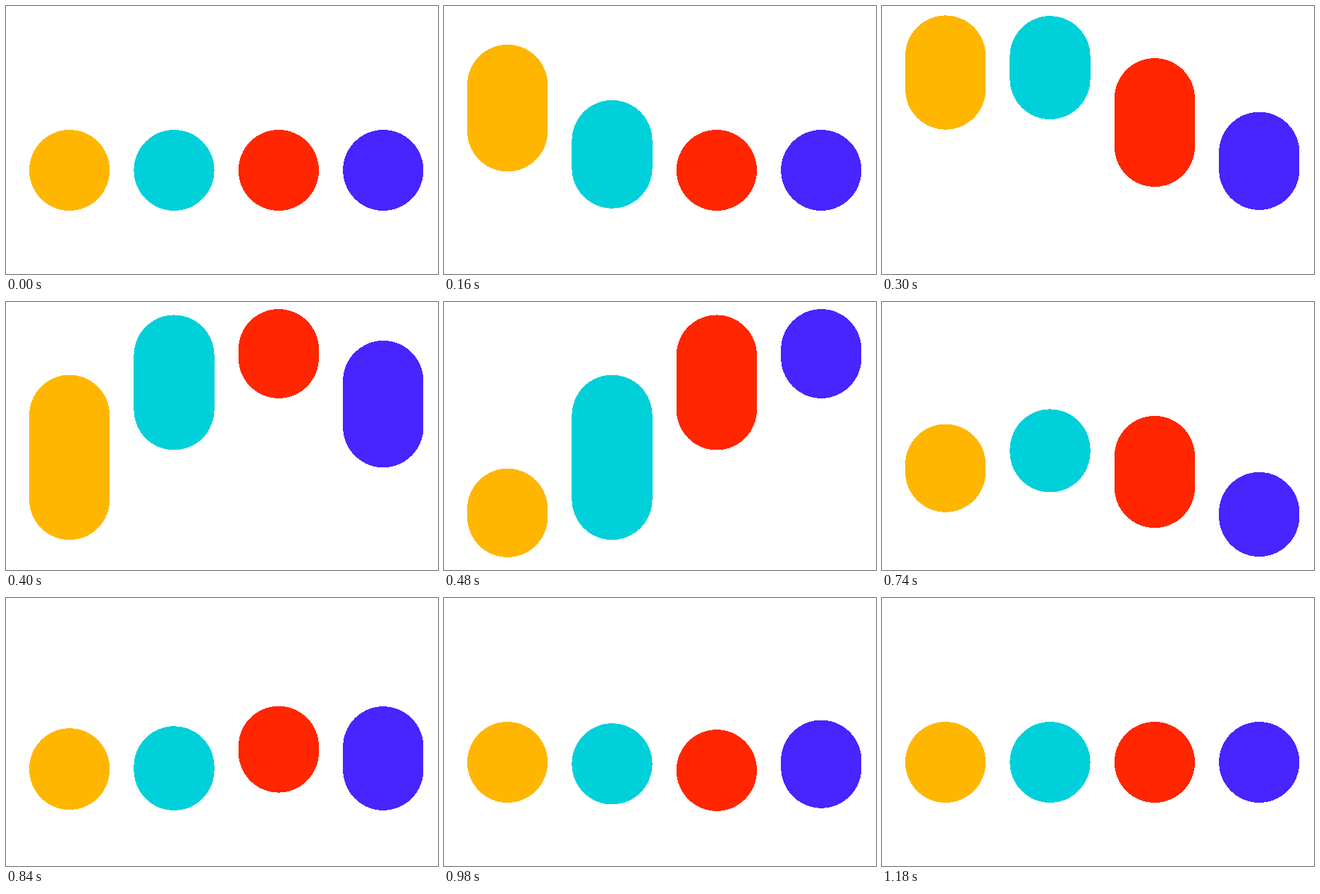
An HTML page that plays this animation: 613x381 px, repeating every 1400 ms.

```html
<!DOCTYPE html>
<html lang="en">
<head>
<meta charset="utf-8">
<title>Bouncing dots</title>
<style>
  html, body { margin: 0; width: 100%; height: 100%; overflow: hidden; background: #fff; }
  svg { display: block; width: 613px; height: 381px; }
</style>
</head>
<body>
<svg viewBox="0 0 613 381" shape-rendering="crispEdges"></svg>
<script>
const LOOP = 1400, STEP = 20, STAGGER = 80;
const SIZE = 115, WIDTH = 114.2, LEFT = 33, PITCH = 148.4;
const COLORS = ['#ffb600', '#00d0da', '#ff2600', '#4824ff'];

// Height of a dot at rest and at each turn of the bounce.
const REST = 176, PEAK = 10, LOW = 248, HOP = 152, DIP = 188.5;

const smooth = bezier(1 / 3, 0, 2 / 3, 1);
const lead = bezier(0.41, 0.2, 0.45, 1);
const trail = bezier(0.52, 0, 0.45, 0.1);

// Moves of each edge: start ms, end ms, goal, easing. The edge in front leads, the other trails.
const TOP = [
  [0, 243, PEAK, smooth],
  [243, 487, LOW, trail],
  [487, 620, HOP, lead],
  [630, 775, DIP, trail],
  [790, 940, REST, smooth]
];
const BOTTOM = [
  [20, 250, PEAK, trail],
  [250, 465, LOW, lead],
  [465, 637, HOP, trail],
  [640, 790, DIP, lead],
  [800, 940, REST, smooth]
];

function bezier(x1, y1, x2, y2) {
  const curve = (a, b, s) => 3 * a * s * (1 - s) ** 2 + 3 * b * s * s * (1 - s) + s ** 3;
  return x => {
    let lo = 0, hi = 1;
    for (let i = 0; i < 24; i++) {
      const mid = (lo + hi) / 2;
      if (curve(x1, x2, mid) < x) lo = mid; else hi = mid;
    }
    return curve(y1, y2, hi);
  };
}

function edge(moves, t) {
  let y = REST;
  for (const [start, end, goal, ease] of moves) {
    if (t <= start) break;
    y += (goal - y) * ease(Math.min(1, (t - start) / (end - start)));
  }
  return y;
}

const svg = document.querySelector('svg');
const dots = COLORS.map((fill, i) => {
  const dot = document.createElementNS(svg.namespaceURI, 'rect');
  const attrs = { x: LEFT + i * PITCH, width: WIDTH, rx: WIDTH / 2, ry: SIZE / 2, fill };
  for (const name in attrs) dot.setAttribute(name, attrs[name]);
  return svg.appendChild(dot);
});

function draw(now) {
  const time = Math.floor(now % LOOP / STEP) * STEP;
  dots.forEach((dot, i) => {
    const t = time - i * STAGGER;
    const y = edge(TOP, t);
    dot.setAttribute('y', y);
    dot.setAttribute('height', Math.max(SIZE, edge(BOTTOM, t) + SIZE - y));
  });
}

const start = performance.now();
function tick() {
  draw(performance.now() - start);
  requestAnimationFrame(tick);
}
tick();
</script>
</body>
</html>
```
